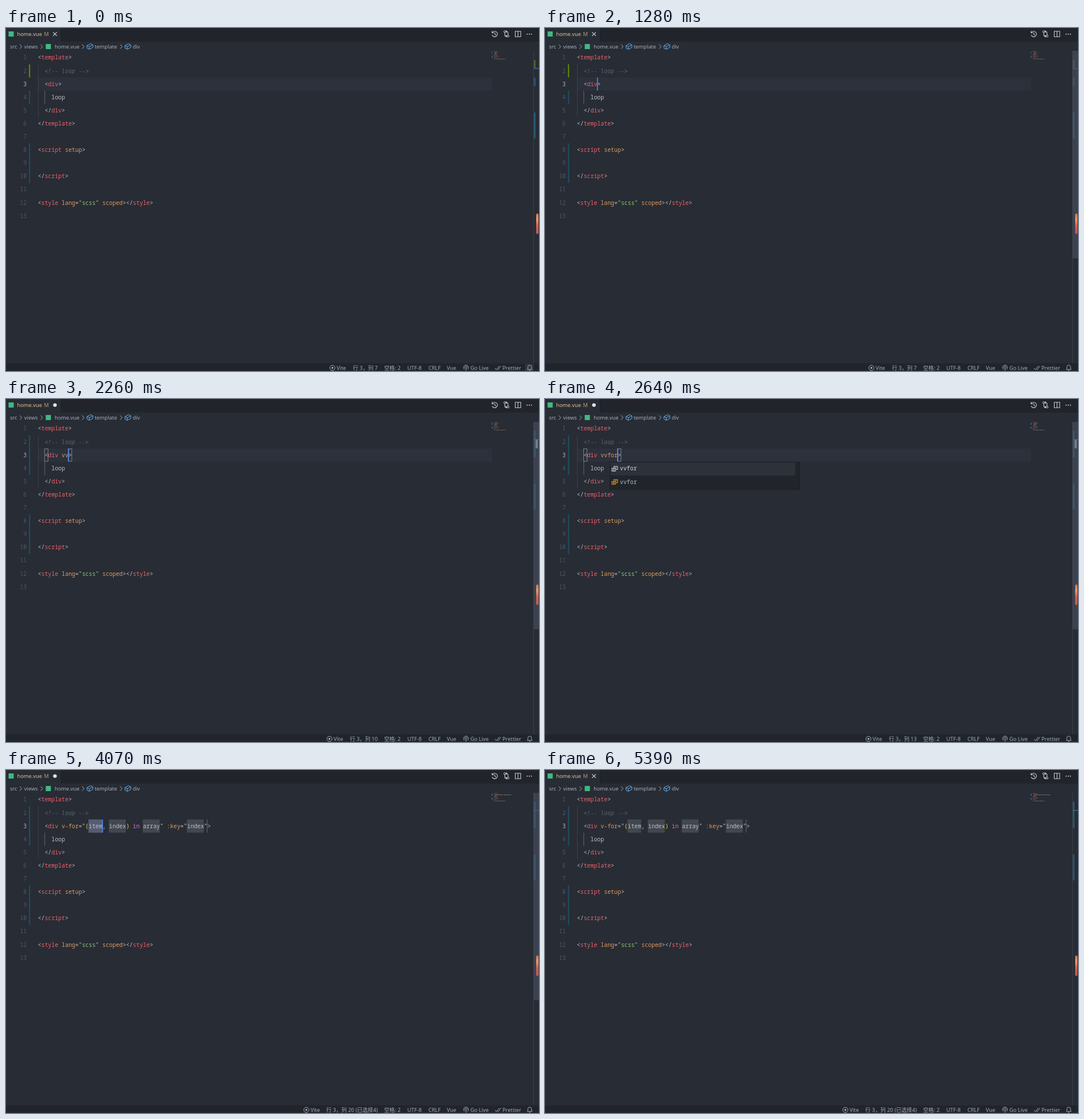
These frames come from a looping animation (932 px wide and 601 px high, 5520 ms). An HTML page:

```html
<!DOCTYPE html>
<html lang="zh">
<head>
<meta charset="utf-8">
<title>home.vue</title>
<style>
html, body { margin: 0; width: 100%; height: 100%; overflow: hidden; background: #282c34; }
svg { display: block; width: 932px; height: 601px; }
text { white-space: pre; }
.code { font: 9.88px "Noto Sans Mono", "DejaVu Sans Mono", monospace; }
.note { font: italic 9.85px "DejaVu Sans Mono", monospace; }
.ui { font: 9.3px "Noto Sans", "Noto Sans CJK SC", "Noto Sans CJK", sans-serif; fill: #a4abb8; }
.doc { font: 10.03px "Noto Sans", "Open Sans", sans-serif; fill: #b4bac5; }
</style>
</head>
<body>
<svg id="editor" viewBox="0 0 932 601">
  <defs>
    <pattern id="hatch" width="3" height="3" patternUnits="userSpaceOnUse">
      <rect width="3" height="3" fill="#1b586f"/>
      <path d="M0 3L3 0" stroke="#282c34" stroke-width=".9"/>
    </pattern>
    <linearGradient id="ember" x2="0" y2="1">
      <stop offset="0" stop-color="#c9774f"/>
      <stop offset=".3" stop-color="#ee9868"/>
      <stop offset=".6" stop-color="#d2624f"/>
      <stop offset="1" stop-color="#c4574f"/>
    </linearGradient>
  </defs>
</svg>
<script>
(() => {
const LOOP = 5520, X0 = 55.8, CW = 5.93, LH = 23.1;
const stage = document.getElementById('editor');
const timed = [];
const colors = { p: '#bbbfc8', r: '#ef6069', o: '#dc9a5f', g: '#8bcb78', v: '#d06fdc', y: '#ffd31a', c: '#5c6370' };

function el(tag, attrs, parent = stage, text) {
  const node = document.createElementNS('http://www.w3.org/2000/svg', tag);
  for (const k in attrs) node.setAttribute(k, attrs[k]);
  if (text !== undefined) node.textContent = text;
  return parent.appendChild(node);
}
const group = parent => el('g', {}, parent);
const rect = (x, y, w, h, fill, parent, more) => el('rect', { x, y, width: w, height: h, fill, ...more }, parent);
const label = (x, y, s, cls, parent, more) => el('text', { x, y, class: cls, ...more }, parent, s);
const line = (d, stroke, parent, w = 1) => el('path', { d, stroke, fill: 'none', 'stroke-width': w }, parent);

// Steps are [time, opacity]; each value holds until the next step.
function steps(node, list) { timed.push({ node, list, now: null }); return node; }
const during = (node, from, to = LOOP) => steps(node, [[0, from ? 0 : 1], [from, 1], [to, 0]]);

const colX = col => X0 + col * CW;
const rowMid = row => 52 + (row - 1) * LH;
const rowTop = row => rowMid(row) - 11.5;

function code(row, col, source, parent = stage) {
  for (const part of source.split('|')) {
    const s = part.slice(1), fill = colors[part[0]];
    label(colX(col), rowMid(row) + 3.4, s, part[0] === 'c' ? 'note' : 'code', parent, { fill });
    if (s.trim()) rect(853 + col * .6, 40.6 + (row - 1) * 1.2, s.length * .6, .9, fill, parent, { opacity: .5 });
    col += s.length;
  }
}

// Window bars
rect(0, 0, 932, 601, '#282c34');
rect(97, 0, 835, 24, '#21252b');
rect(96, 0, 1, 24, '#1b1e24');
rect(0, 587.5, 932, 13.5, '#21252b');

// Tab
const logo = (x, y) => rect(x, y, 9, 9, '#41b883');
logo(4.5, 6);
label(19.5, 14, 'home.vue', 'ui', stage, { style: 'fill:#e2c08d' });
label(66.5, 14, 'M', 'ui', stage, { style: 'fill:#b89c73' });
const cross = (x, y, parent, r = 3.3) =>
  line(`M${x - r} ${y - r}L${x + r} ${y + r}M${x + r} ${y - r}L${x - r} ${y + r}`, '#d7dae0', parent, 1.1);
steps(cross(85.6, 10.6), [[0, 1], [1730, 0], [4650, 1]]);
during(el('circle', { cx: 85.6, cy: 10.6, r: 3.2, fill: '#dfe2e7' }), 1730, 4650);

// Breadcrumb
[[7, 'src'], [31.8, 'views'], [85, 'home.vue'], [155, 'template'], [221.5, 'div']]
  .forEach(([x, s]) => label(x, 36.3, s, 'ui'));
[24, 60.5, 133, 199.5].forEach(x => line(`M${x} 28.8l3.6 3.8l-3.6 3.8`, '#a4abb8'));
logo(69.5, 28);
[146.7, 213].forEach(x =>
  line(`M${x - 5} 30.8l6.2-3.3l4 2v4.6l-6.2 3.2l-4-2zl4 2l6.2-3.3M${x - 1} 32.8v4.5`, '#61afef'));

// Toolbar icons
const tool = d => line(d, '#c9ccd2', stage, 1.1);
tool('M850.5 8a4.8 4.8 0 1 1-.4 4.3M850 5.3v3.2h3.2M854.8 7.7v3.3l2.4 1.6');
tool('M872.2 7.2v5.2q0 2 2.2 2h1.5M874.2 12.6l2 1.8l-2 1.8M877.8 13v-4.7q0-2-2.2-2h-1.4M875.8 4.5l-2 1.8l2 1.8');
[[872.1, 6.4], [877.9, 14.1]].forEach(([cx, cy]) =>
  el('circle', { cx, cy, r: 1.7, fill: '#21252b', stroke: '#c9ccd2' }));
tool('M890.5 5.8h9.5v9.4h-9.5zM895.3 5.8v9.4');
[911.3, 915, 918.7].forEach(cx => el('circle', { cx, cy: 10.7, r: 1, fill: '#c9ccd2' }));

// Editor gutter, guides and active line
during(rect(X0 + .7, rowTop(3), 850 - X0 - .7, 23, '#2c313c'), 0, 3000);
for (let n = 1; n <= 13; n++)
  label(36.3, rowMid(n) + 3.4, n, 'code', stage, { 'text-anchor': 'end', fill: n === 3 ? '#abb2bf' : '#4f5768' });
const ADDED = '#5b8207', EDITED = 'url(#hatch)';
const bar = (row, count, fill) => {
  const g = group();
  rect(40, rowTop(row), 2.3, LH * count, fill, g);
  rect(849.3, 40.2 + (row - 1) * 1.2, 1.4, 1.2 * count, fill === ADDED ? fill : '#2a7696', g);
  return g;
};
during(bar(2, 1, ADDED), 0, 1890);
bar(4, 1, EDITED);
bar(8, 3, EDITED);
during(bar(2, 3, EDITED), 1890);
rect(56, rowTop(2), 1, LH * 4, '#3b4049');
rect(67.3, rowTop(4), 1, LH, '#626976');

// Fixed code lines
code(1, 0, 'p<|rtemplate|p>');
code(2, 2, 'c<!-- loop -->');
code(4, 4, 'ploop');
code(5, 2, 'p</|rdiv|p>');
code(6, 0, 'p</|rtemplate|p>');
code(8, 0, 'p<|rscript|p |osetup|p>');
code(10, 0, 'p</|rscript|p>');
code(12, 0, 'p<|rstyle|p |olang|p=|g"scss"|p |oscoped|p></|rstyle|p>');

// Line three: boxes, typed text, expanded snippet
const bracket = (col, parent) =>
  rect(colX(col) - .1, rowTop(3) + .5, CW, 22, 'none', parent, { stroke: '#858b95', 'stroke-width': .9 });
const caret = (col, parent) => rect(colX(col) - .5, rowTop(3), 1.5, 23, '#528bff', parent);

const marks = group();
[[15, 4], [21, 5], [31, 5], [44, 5]].forEach(([col, n]) =>
  rect(colX(col) - .5, rowTop(3), n * CW, 23, '#43474f', marks));
rect(351.3, rowTop(3), 1, 23, '#666b75', marks);
during(marks, 3000);
during(rect(colX(15) - .5, rowTop(3), 4 * CW, 23, '#565d71'), 3000, 5280);
code(3, 2, 'p<|rdiv');
during(bracket(2), 1460, 3000);

const plain = group();
code(3, 6, 'p>', plain);
during(plain, 0, 1460);
during(caret(6), 1280, 1460);

const typing = [['', 1460], ['v', 2130], ['vv', 2260], ['vvf', 2380], ['vvfo', 2510], ['vvfor', 2640]];
typing.forEach(([s, from], i) => {
  const g = group(), end = 7 + s.length;
  code(3, 7, (s ? 'o' + s + '|' : '') + 'p>', g);
  bracket(end, g);
  caret(end, g);
  during(g, from, i < 5 ? typing[i + 1][1] : 3000);
});

const full = group();
code(3, 7, 'ov-for|p="|y(|pitem, index|y)|p |vin|p array" |o:key|p="index">', full);
during(full, 3000);
steps(caret(19), [[0, 0], [3000, 1], [3620, 0], [4070, 1], [4520, 0], [5030, 1], [5280, 0]]);

// Overview ruler and scrollbar
rect(922, 40, 1, 547.5, '#3a3f48');
const before = group(), blue = '#23566f';
rect(923, 56, 3, 14.5, '#4a6215', before);
rect(923, 87, 3, 15, blue, before);
during(before, 0, 1890);
during(rect(923, 55.5, 3, 46.5, blue), 1890);
rect(923, 148, 3, 45.5, blue);
during(rect(926, 71, 4, 15.5, '#a6a9ae'), 1460, 3000);
rect(923, 70.3, 9, 1.1, '#4a79a8');
steps(rect(922.5, 40, 9.5, 363.5, '#4e5666', stage, { 'fill-opacity': .55 }),
  [[0, 0], [100, 1], [4770, .75], [4900, .5], [5030, .3], [5280, .1], [5390, 0]]);
rect(927, 325, 4, 36, 'url(#ember)', stage, { rx: 2 });

// Suggestions
function popup(x, items) {
  const g = group(), rowH = 23.13;
  rect(x, 110.5, 331, items.length * rowH + 1.5, '#21252b', g, { stroke: '#1a1d23' });
  rect(x + .5, 111, 323, rowH, '#2c313a', g);
  items.forEach((s, i) => {
    const y = 122 + i * rowH, c = i ? '#d58f2b' : '#b9bec8';
    label(x + 17, y + 3.4, s, 'code', g, { fill: i ? '#b3b9c4' : '#d7dae0' });
    line(`M${x + 6.5} ${y - 1}v-2.8h6.3v5.2h-3`, c, g, 1.2);
    line(`M${x + 3} ${y - .6}h6.2v5h-6.2zM${x + 4.5} ${y + 1}h3.2M${x + 4.5} ${y + 2.7}h3.2M${x + 8.5} ${y - 1.8}h2.6`, c, g, 1.1);
  });
  return g;
}
const list = popup(97.7, ['key', 'ref', 'slot', 'slot-scope', 'v-bind', 'v-cloak', 'v-else',
  'v-else-if', 'v-for', 'v-html', 'v-if', 'v-model']);
rect(421, 111, 7.5, 39, '#3d434e', list);
rect(429.5, 110.5, 255, 86.5, '#21252b', list, { stroke: '#1a1d23' });
label(433, 129.7, 'Hint at VNodes identity for VDom diffing, e.g.', 'doc', list);
label(433, 152.8, 'list rendering', 'doc', list);
label(433, 186.5, 'API Reference', 'doc', list, { style: 'fill:#3b93ff' });
cross(670.4, 120.2, list, 2.9);
during(list, 1890, 2130);
during(popup(114, ['vvfor', 'vvfor']), 2640, 3000);

// Status bar
function position(s, viteX, from, to) {
  const g = group();
  el('circle', { cx: viteX - 7.2, cy: 595.5, r: 4.5, fill: 'none', stroke: '#a4abb8' }, g);
  el('circle', { cx: viteX - 7.2, cy: 595.5, r: 1.7, fill: '#a4abb8' }, g);
  label(viteX, 599, 'Vite', 'ui', g);
  label(650, 599, '行 3，列 ' + s, 'ui', g, { 'text-anchor': 'end' });
  during(g, from, to);
}
position('7', 578, 0, 1730);
position('8', 578, 1730, 2130);
position('9', 578, 2130, 2260);
position('10', 572.8, 2260, 2380);
position('11', 572.8, 2380, 2510);
position('12', 572.8, 2510, 2640);
position('13', 572.8, 2640, 3120);
position('20 (已选择4)', 532.4, 3120, LOOP);
[[661.3, '空格: 2'], [701.8, 'UTF-8'], [738.7, 'CRLF'], [770.8, 'Vue'], [812, 'Go Live'], [868, 'Prettier']]
  .forEach(([x, s]) => label(x, 599, s, 'ui'));
const icon = d => line(d, '#a4abb8');
icon('M802 598.3a4.2 4.2 0 1 1 4.8 0M803 596a2 2 0 1 1 2.8 0M804.4 594.8v5.5');
icon('M855 596l2.5 2.8l5-6.6M859.5 598l1 .8l5-6.6');
during(rect(907.5, 588, 15, 13, '#30353f'), 0, 1280);
icon('M911.5 598.2h8.6l-1.1-1.8v-2.5a3.2 3.2 0 0 0-6.4 0v2.5zM914.5 599.8h2.6');

const start = performance.now();
function draw(now) {
  const t = Math.max(0, now - start) % LOOP;
  for (const item of timed) {
    let v = 0;
    for (const [at, value] of item.list) if (t >= at) v = value;
    if (v !== item.now) item.node.style.opacity = item.now = v;
  }
}
function tick(now) {
  draw(now);
  requestAnimationFrame(tick);
}
draw(start);
requestAnimationFrame(tick);
})();
</script>
</body>
</html>
```
